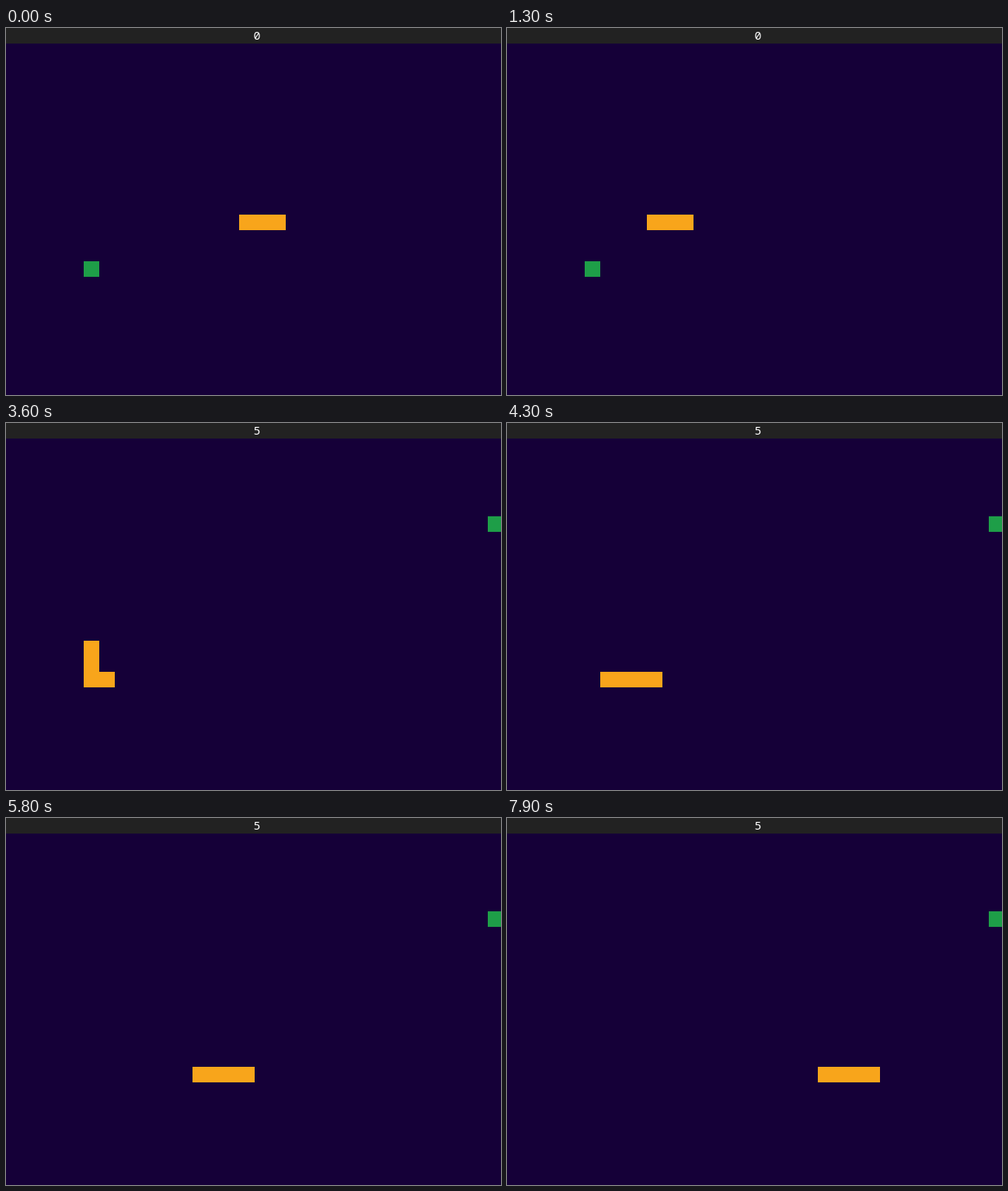
Recreate the animation shown at these times as an HTML page with a canvas. Size 637 px wide and 472 px high, loop 8 s.

```html
<!DOCTYPE html>
<html lang="en">
<head>
<meta charset="utf-8">
<title>Snake</title>
<style>
  html, body { margin: 0; width: 100%; height: 100%; overflow: hidden; background: #150038; }
  canvas { display: block; }
</style>
</head>
<body>
<canvas id="stage" width="637" height="472"></canvas>
<script>
const ctx = document.getElementById('stage').getContext('2d');
const CELL = 20, LOOP = 8000, TICK = 100, STEP = 251.9;
const EAT = 13; // step at which the food is reached

function square([col, row], color) {
  ctx.fillStyle = color;
  ctx.fillRect(col * CELL, row * CELL, CELL, CELL);
}

// Cell the head enters at step k: left, then down, then right.
function headAt(k) {
  if (k <= 10) return [15 - k, 12];
  if (k <= 14) return [5, k + 2];
  return [k - 9, 16];
}

function draw(time) {
  const shown = Math.floor(time / TICK) * TICK;
  const step = Math.ceil(shown / STEP);
  const eaten = step >= EAT;

  ctx.fillStyle = '#150038';
  ctx.fillRect(0, 0, 637, 472);
  ctx.fillStyle = '#222';
  ctx.fillRect(0, 0, 637, CELL);

  ctx.fillStyle = '#fff';
  ctx.font = '15px "Noto Sans Mono", monospace';
  ctx.textAlign = 'center';
  ctx.fillText(eaten ? '5' : '0', 323, 15);

  square(eaten ? [31, 6] : [5, 15], '#1e9e48');
  const length = eaten ? 4 : 3;
  for (let i = 0; i < length; i++) square(headAt(step - i), '#f8a51b');
}

const start = performance.now();
function frame() {
  draw((performance.now() - start) % LOOP);
  requestAnimationFrame(frame);
}
frame();
</script>
</body>
</html>
```
